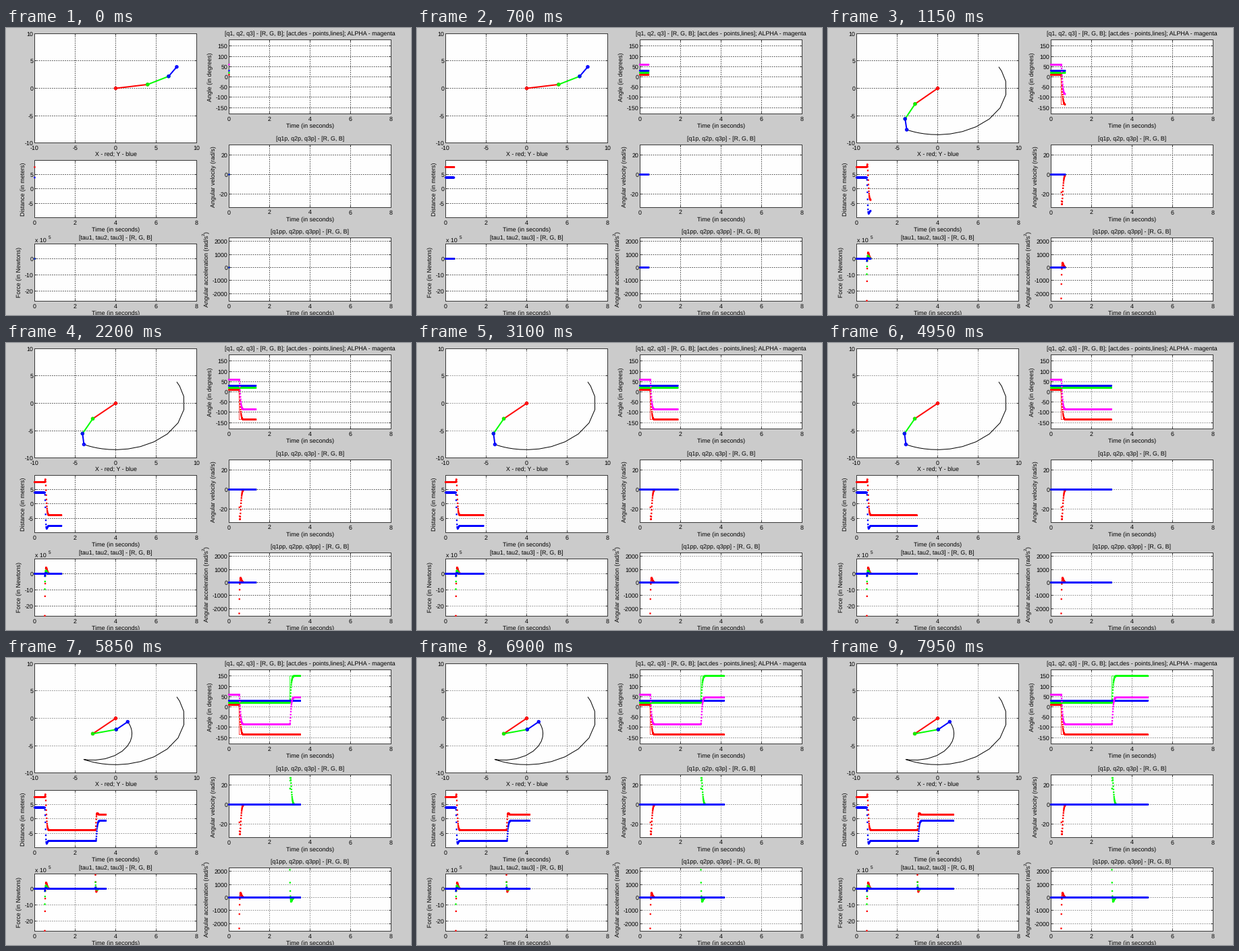
Write a matplotlib script that moves like this. It is 600 by 426 pixels and loops after 8 s.

```python
import numpy as np
import matplotlib.pyplot as plt
from matplotlib.animation import FuncAnimation
from matplotlib.collections import LineCollection
from matplotlib.patches import Circle, Rectangle

W, H, DPI = 600, 426, 64
FRAMES, INTERVAL, STEPS = 160, 50, 3
DT = 0.01
GRID_FADE = 48
DOT = 2.3
RED, GREEN, BLUE, MAGENTA = "#ff0000", "#00ff00", "#0000ff", "#ff00ff"
RGB = (RED, GREEN, BLUE)

# integer coordinates are pixel centres, so snapping would only shift things
plt.rcParams.update({
    "font.family": "Liberation Sans",
    "lines.scale_dashes": False,
    "path.snap": False,
    "path.simplify": False,
    "text.hinting": "none",
})


def px(v):
    """Pixels to points."""
    return v * 72 / DPI


# ---- three-link arm: joints follow their set points as a damped oscillator
LEN = np.array([4.0, 3.0, 2.0])
MASS = 4.72 * LEN
OMEGA, ZETA = 30.7, 0.92
START = np.array([10.0, 20.0, 30.0])
MOVES = {0: (0.5, -145.0), 1: (3.0, 130.0)}

t = np.arange((FRAMES - 1) * STEPS + 1) * DT
q = np.radians(START)[:, None] * np.ones_like(t)
want = q.copy()
vel, acc = np.zeros_like(q), np.zeros_like(q)
root = np.sqrt(1 - ZETA ** 2)
for j, (t0, turn) in MOVES.items():
    on = t > t0 - DT / 2
    s = t[on] - t0
    step = np.radians(turn)
    decay = step * np.exp(-ZETA * OMEGA * s)
    c, sn = np.cos(OMEGA * root * s), np.sin(OMEGA * root * s) / root
    want[j, on] += step
    q[j, on] += step - decay * (c + ZETA * sn)
    vel[j, on] = OMEGA * decay * sn
    acc[j, on] = OMEGA ** 2 * decay * (c - ZETA * sn)

# forward kinematics and joint loads, with the plane as complex numbers
theta, om, al = (np.cumsum(m, axis=0) for m in (q, vel, acc))
link = LEN[:, None] * np.exp(1j * theta)
link_acc = link * (1j * al - om ** 2)
zero = np.zeros((1, t.size))
joints = np.vstack([zero, np.cumsum(link, axis=0)])
joint_acc = np.vstack([zero, np.cumsum(link_acc, axis=0)])
center = joints[:-1] + link / 2
center_acc = joint_acc[:-1] + link_acc / 2
tau = np.zeros_like(q)
for j in range(3):
    for i in range(j, 3):
        arm = center[i] - joints[j]
        tau[j] += MASS[i] * (np.conj(arm) * center_acc[i]).imag
        tau[j] += MASS[i] * LEN[i] ** 2 / 12 * al[i]
tau /= 1e5
tip = joints[3]

# ---- stage in pixel coordinates
fig = plt.figure(figsize=(W / DPI, H / DPI), dpi=DPI, facecolor="#cbcbcb")
ax = fig.add_axes([0, 0, 1, 1])
ax.set_xlim(-0.5, W - 0.5)
ax.set_ylim(H - 0.5, -0.5)
ax.axis("off")


def write(x, y, text, ha="center", size=8.9, **kw):
    ax.text(x, y, text, ha=ha, va="baseline", fontsize=px(size), color="black", **kw)


def write_up(x, y, text, ha="center", size=8.9):
    write(x, y, text, ha, size, rotation=90, rotation_mode="anchor")


class Panel:
    grids = []

    def __init__(self, box, xticks, yticks, y0, scale, title="", ylabel=None, xlabel=True):
        self.l, self.t, self.r, self.b = box
        self.x0, self.x1 = xticks[0], xticks[-1]
        self.y0, self.scale = y0, scale
        ax.add_patch(Rectangle((self.l, self.t), self.r - self.l, self.b - self.t,
                               fc="#fefefe", ec="none", zorder=0))
        grid, ticks = [], []
        for v in xticks:
            x = round(self.x(v))
            grid.append([(x, self.b), (x, self.t)])
            ticks += [[(x, self.b), (x, self.b - 3)], [(x, self.t), (x, self.t + 3)]]
            write(x, self.b + 10, str(v))
        for v in yticks:
            y = round(self.y(v))
            grid.append([(self.l, y), (self.r, y)])
            ticks += [[(self.l, y), (self.l + 3, y)], [(self.r, y), (self.r - 3, y)]]
            write(self.l - 2, y + 3.3, str(v), "right")
        lines = LineCollection(grid, linewidths=px(1), zorder=1,
                               linestyles=[(0, (px(1.6), px(1.6)))])
        Panel.grids.append(ax.add_collection(lines))
        ax.add_collection(LineCollection(ticks, colors="#303030", linewidths=px(1), zorder=1.2))
        ax.add_patch(Rectangle((self.l, self.t), self.r - self.l, self.b - self.t,
                               fc="none", ec="#383838", lw=px(1), zorder=1.3))
        mid = (self.l + self.r) / 2
        write(mid, self.t - 6.7, title, size=8.85)
        if xlabel:
            write(mid, self.b + 20.3, "Time (in seconds)", size=9)
        if ylabel:
            write_up(ylabel[1], ylabel[2], ylabel[0])

    def x(self, v):
        return self.l + (v - self.x0) * (self.r - self.l) / (self.x1 - self.x0)

    def y(self, v):
        return self.y0 - v * self.scale


seconds = (0, 2, 4, 6, 8)
tens = (-10, -5, 0, 5, 10)
plane = Panel((42, 8, 282, 170), tens, tens, 89, 8.1, xlabel=False)
dist = Panel((42, 196, 282, 281), seconds, (5, 0, -5), 238.4, 4.3,
             "X - red; Y - blue", ("Distance (in meters)", 27.5, 238.5))
force = Panel((42, 320, 282, 405), seconds, (0, -10, -20), 342, 2.4,
              "[tau1, tau2, tau3] - [R, G, B]", ("Force (in Newtons)", 22, 362))
angle = Panel((330, 17, 570, 127), seconds, (150, 100, 50, 0, -50, -100, -150), 72, 0.305,
              "[q1, q2, q3] - [R, G, B]; [act,des - points,lines]; ALPHA - magenta",
              ("Angle (in degrees)", 305, 72))
speed = Panel((330, 173, 570, 266), seconds, (20, 0, -20), 217, 1.475,
              "[q1p, q2p, q3p] - [R, G, B]", ("Angular velocity (rad/s)", 310, 220))
accel = Panel((330, 311, 570, 405), seconds, (2000, 1000, 0, -1000, -2000), 355, 0.01925,
              "[q1pp, q2pp, q3pp] - [R, G, B]")
write_up(300, 414, "Angular acceleration (rad/s", "left")
write_up(294, 308, "2", "left", 6.2)
write_up(300, 304.5, ")", "left")
write(42.5, 317, "x 10", "left")
write(62, 312, "5", "left", 6.5)

# ---- moving parts: (line, x pixels, y pixels, vertices per time step)
trails = []


def trail(xs, ys, color, z, width, per=1):
    line, = ax.plot([], [], color=color, zorder=z, lw=px(width))
    line.set_solid_capstyle("butt")
    trails.append((line, xs, ys, per))


def dots(panel, values, color):
    """Each dot is a dash as long as it is thick."""
    xs = (panel.x(t)[:, None] + [-DOT / 2, DOT / 2, np.nan]).ravel()
    trail(xs, np.repeat(panel.y(values), 3), color, 3, DOT, 3)


for j, color in enumerate(RGB):
    trail(angle.x(t), angle.y(np.degrees(want[j])), color, 2, 0.7)
    dots(angle, np.degrees(q[j]), color)
    dots(speed, vel[j], color)
    dots(accel, acc[j], color)
    dots(force, tau[j], color)
dots(angle, np.degrees(theta[2]), MAGENTA)
dots(dist, tip.real, RED)
dots(dist, tip.imag, BLUE)
trail(plane.x(tip.real), plane.y(tip.imag), "black", 2, 1)

links = []
for i, color in enumerate(RGB):
    bar, = ax.plot([], [], color=color, lw=px(2), zorder=4 + i)
    rings = [ax.add_patch(Circle((0, 0), 1.9, fc="none", ec=color, lw=px(1.6),
                                 zorder=4.5 + i)) for _ in range(2)]
    links.append((bar, rings))


def draw(k):
    n = k * STEPS + 1
    for line, xs, ys, per in trails:
        line.set_data(xs[:n * per], ys[:n * per])
    for i, (bar, rings) in enumerate(links):
        ends = joints[i:i + 2, n - 1]
        xs, ys = plane.x(ends.real), plane.y(ends.imag)
        bar.set_data(xs, ys)
        for ring, x, y in zip(rings, xs, ys):
            ring.center = (x, y)
    for grid in Panel.grids:
        grid.set_color("#484848" if k < GRID_FADE else "#8c8c8c")
    return [row[0] for row in trails] + [row[0] for row in links] + Panel.grids


anim = FuncAnimation(fig, draw, frames=FRAMES, interval=INTERVAL,
                     repeat=True, repeat_delay=0, blit=False)
plt.show()
```
